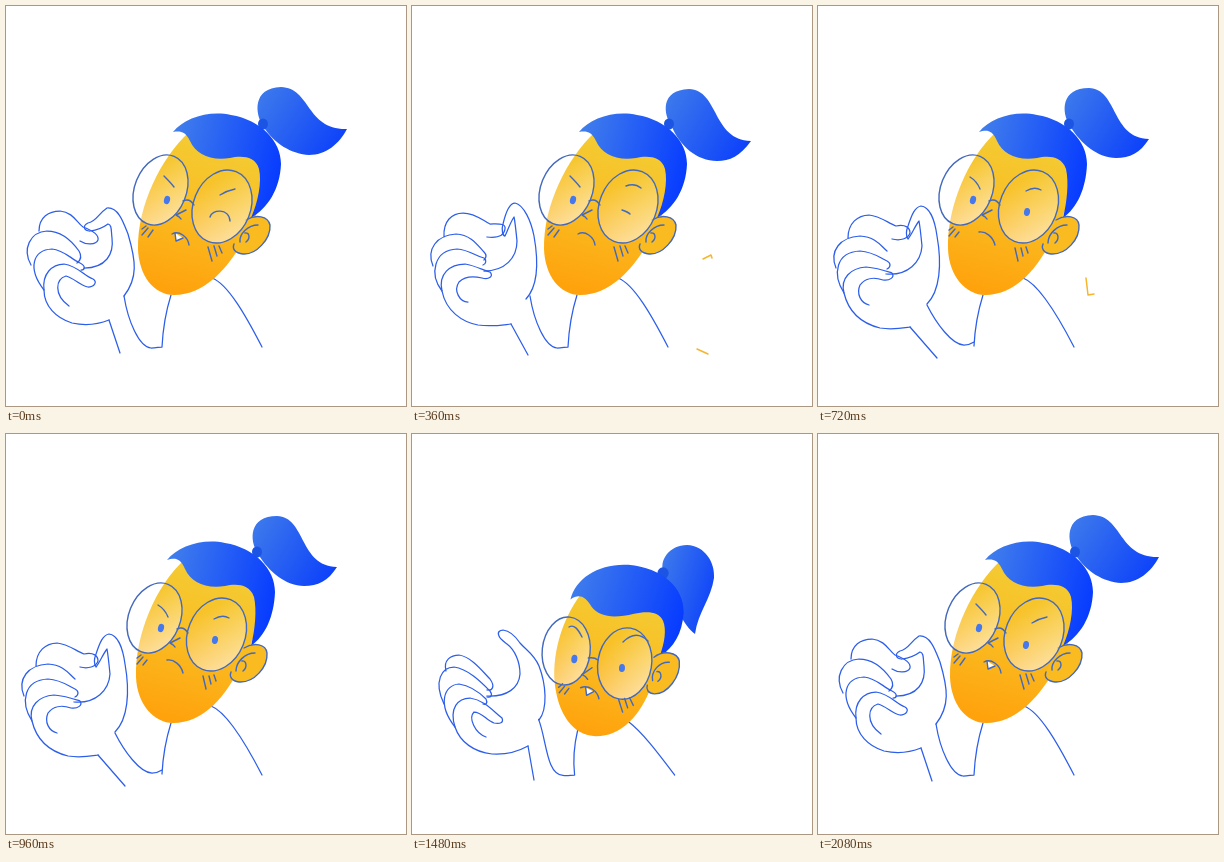
An HTML page that plays this animation: 400x400 px, repeating every 2.12 s.

```html
<!DOCTYPE html>
<html lang="en">
<head>
<meta charset="utf-8">
<title>Finger flick</title>
<style>
html, body { margin: 0; width: 100%; height: 100%; overflow: hidden; background: #fff; }
svg { display: block; width: 100vw; height: 100vh; }
path, ellipse, circle { fill: none; stroke-linecap: round; stroke-linejoin: round; vector-effect: non-scaling-stroke; }
.line { stroke: #2c5eea; stroke-width: 1.25; }
.ink { stroke: #4269bd; stroke-width: 1.4; }
.eye { fill: #4478ec; }
</style>
</head>
<body>
<svg id="stage" viewBox="0 0 400 400">
  <defs>
    <linearGradient id="skin" x1=".6" y1="0" x2=".4" y2="1">
      <stop offset="0" stop-color="#f3cc35"/><stop offset=".45" stop-color="#f9bf24"/><stop offset="1" stop-color="#ffa20c"/>
    </linearGradient>
    <linearGradient id="hair" x1="0" y1=".35" x2="1" y2=".6">
      <stop offset="0" stop-color="#3f7cec"/><stop offset="1" stop-color="#063bff"/>
    </linearGradient>
    <linearGradient id="tail" x1="0" y1=".2" x2="1" y2=".7">
      <stop offset="0" stop-color="#3c78ec"/><stop offset="1" stop-color="#0d42fa"/>
    </linearGradient>
    <linearGradient id="lens" x1=".1" y1=".1" x2=".8" y2=".9">
      <stop offset=".15" stop-color="#fff" stop-opacity="0"/><stop offset="1" stop-color="#fff" stop-opacity=".55"/>
    </linearGradient>
  </defs>
</svg>
<script>
const LOOP = 2120, STEP = 40;
const stage = document.getElementById('stage');

// Keys are [time, pose]; a fractional pose blends two neighbours.
const bodyKeys = [[0, 0], [400, 0], [720, 1], [1000, 1], [1120, 1.6], [1200, 2], [1480, 2.34], [1760, 2.73], [2080, 3]];
const limbKeys = [[0, 0], [360, 1], [720, 2], [1000, 2], [1120, 2.6], [1200, 3], [1480, 4], [1760, 5], [2080, 6]];

function poseAt(keys, t) {
  for (let i = 1; i < keys.length; i++) {
    const [t0, p0] = keys[i - 1], [t1, p1] = keys[i];
    if (t <= t1) return p0 + (p1 - p0) * (t - t0) / (t1 - t0);
  }
  return keys[keys.length - 1][1];
}

function blend(a, b, k) {
  const to = b.match(/-?[\d.]+/g);
  let i = 0;
  return a.replace(/-?[\d.]+/g, n => (+n + (to[i++] - n) * k).toFixed(2));
}

const parts = [];
function add(tag, attrs, keys, name, poses, shown) {
  const el = document.createElementNS('http://www.w3.org/2000/svg', tag);
  for (const key in attrs) {
    if (key === 'fill') el.style.fill = attrs.fill;
    else el.setAttribute(key, attrs[key]);
  }
  stage.append(el);
  parts.push({ el, keys, name, poses, shown });
}
const path = (attrs, keys, poses, shown) => add('path', attrs, keys, 'd', poses, shown);
const oval = (attrs, poses, shown) =>
  add('ellipse', { rx: 1, ry: 1, ...attrs }, bodyKeys, 'transform',
    poses.map(([x, y, rx, ry, turn]) => `translate(${x} ${y}) rotate(${turn}) scale(${rx} ${ry})`), shown);

const line = { class: 'line' }, ink = { class: 'ink' };

// Neck, shoulder and forearm
path(line, bodyKeys, [
  'M165 289C160 305 157 320 156 341M118 290C122 315 133 341 145 342C150 342 153 341 156 341M206 272C222 278 240 310 256 341',
  'M165 289C160 305 157 320 156 340M109 299C118 317 134 339 146 339C150 339 153 338 156 336M205 272C221 278 240 310 256 341',
  'M166 300C163 315 163 330 166 341M131 283C141 300 135 341 154 341C158 342 162 341 166 341M222 296C235 309 250 325 266 341']);
path(line, limbKeys, ['M103 314L114 347', 'M99 318L116 349', 'M92 321L119 352', 'M122 311L125 345', 'M116 312L122 346', 'M109 314L118 347']);

// Hand: thumb, index and middle, ring, little finger with palm
path(line, limbKeys, [
  'M78 262C100 262 108 248 106 232C105 224 106 219 102 218C98 221 92 224 84 225C78 225 76 220 82 217C90 216 92 208 101 202C112 201 117 215 122 228C130 255 132 272 118 290',
  'M72 265C93 265 105 252 105 235C104 225 103 215 102 211C98 217 96 224 93 230C91 230 89 224 91 218C94 205 98 197 103 197C112 199 119 215 122 230C127 258 126 280 114 293',
  'M68 268C90 270 103 256 104 240C103 230 102 220 101 215C97 220 94 228 90 233C88 230 88 225 90 220C94 208 97 201 103 200C112 201 117 215 119 230C124 258 122 285 109 298',
  'M81 264C95 266 107 260 108 246C109 236 104 225 98 213C95 209 93 206 92 203C91 200 91 198 92 196C93 188 99 187 102 189C108 192 102 203 112 214C134 238 143 260 131 283',
  'M75 262C95 263 107 254 108 240C108 228 103 216 95 210C91 207 88 205 87 202C85 198 88 196 91 196C99 197 104 203 108 209C114 216 122 220 127 232C134 250 136 275 127 286',
  'M76 262C98 262 107 248 106 236C105 227 104 221 99 218C95 217 90 221 84 221C79 221 77 216 83 213C90 210 94 205 101 203C110 204 117 215 123 228C131 255 132 272 123 287']);
path(line, limbKeys, [
  'M33 225C33 211 43 205 54 205C67 206 71 217 77 221C88 225 93 229 92 234C90 239 80 239 74 235M25 259C16 243 24 226 41 225C56 225 66 235 73 245C76 250 75 254 71 257',
  'M32 231C31 215 40 207 51 207C64 207 71 215 78 218C87 218 94 217 93 223C92 231 84 232 75 231M21 260C14 243 25 229 44 228C60 229 66 240 72 246C75 249 74 252 72 254',
  'M30 232C30 217 40 209 51 209C62 210 70 217 78 220C88 218 92 222 92 227C90 233 82 235 74 233M18 262C11 245 22 231 42 230C58 231 63 240 69 245C72 248 71 252 68 254',
  'M38 240C36 228 43 225 50 225C63 227 75 240 85 250C90 256 86 260 80 258M38 264C26 245 37 236 48 237C62 239 74 252 82 259C85 264 82 266 79 265',
  'M34 237C31 226 39 221 47 221C60 223 71 238 78 245C83 252 81 257 75 256M32 270C21 247 30 233 42 233C57 235 71 250 78 257C81 261 79 264 75 263',
  'M31 232C30 217 41 211 51 211C63 212 69 222 73 230C80 233 87 238 84 242C79 246 68 240 60 232M28 262C16 245 25 230 41 230C55 231 64 241 70 248C74 252 72 256 69 257']);
path(line, limbKeys, [
  'M38 284C21 262 27 244 46 243C58 244 65 253 74 257C80 260 79 264 75 264',
  'M30 285C17 268 22 244 45 243C58 244 63 250 72 252C75 254 74 258 71 259',
  'M26 287C14 268 18 246 42 245C56 246 62 252 69 255C73 257 73 261 69 263',
  'M48 290C31 268 40 250 53 251C67 254 74 262 80 268C82 272 80 274 77 273',
  'M43 293C25 270 32 251 47 250C60 252 68 259 74 265C76 269 74 271 71 270',
  'M40 288C22 268 28 248 45 247C58 249 66 258 76 262C81 265 79 269 75 269']);
path(line, limbKeys, [
  'M63 300C47 288 50 273 60 270C68 272 75 280 82 281C88 281 92 276 87 273C78 270 72 260 58 258C46 258 36 268 38 284C38 300 50 312 66 317C80 320 93 318 103 314',
  'M56 296C48 296 41 285 47 276C53 270 62 270 70 272C77 274 82 270 78 266C72 265 65 260 53 258C38 258 26 268 30 285C34 305 50 316 66 319C80 321 90 319 99 318',
  'M51 299C43 297 38 288 42 279C47 272 56 271 65 274C72 275 77 271 74 267C68 265 60 262 48 261C33 262 22 272 26 287C31 308 46 318 62 322C75 324 85 322 92 321',
  'M80 304C66 298 60 282 67 278C73 279 77 289 84 291C90 293 95 292 93 287C84 281 76 268 62 264C52 264 44 275 48 290C52 308 66 318 85 320C100 320 113 316 122 311',
  'M74 303C63 299 56 284 62 278C70 278 74 286 82 289C88 290 92 289 90 284C81 277 72 266 58 264C46 264 37 274 43 293C48 308 62 318 80 320C95 321 107 317 116 312',
  'M68 301C57 296 52 280 60 275C67 274 73 281 80 284C87 286 91 283 88 278C80 274 70 265 58 263C47 263 35 270 40 288C44 304 56 315 72 319C86 321 98 318 109 314']);

// Ponytail
path({ fill: 'url(#tail)' }, limbKeys, [
  'M257 120C249 108 246 82 275 81C305 82 300 124 341 123C333 138 320 149 303 149C286 148 268 138 257 120Z',
  'M260 121C251 108 248 84 277 83C307 84 300 134 339 135C328 150 318 155 305 155C285 155 268 140 260 121Z',
  'M252 120C243 106 243 82 271 82C300 83 293 132 331 133C322 147 312 152 298 152C280 152 263 138 252 120Z',
  'M250 152C243 138 252 123 271 123C289 123 300 140 299 157C296 178 282 190 278 212C268 205 258 185 250 152Z',
  'M252 140C246 126 258 111 275 111C293 112 303 128 302 144C299 165 286 178 283 200C272 192 260 168 252 140Z',
  'M255 127C249 112 262 100 279 100C296 100 307 120 306 145C303 165 296 178 289 188C286 172 266 160 255 127Z']);
oval({ fill: '#1c55e4' }, [[257, 118, 5, 5.5, 0], [251, 118, 5, 5.5, 0], [248, 150, 6, 6, 0]]);

// Face (its top is tucked under the hair), hair and ear
path({ fill: 'url(#skin)' }, bodyKeys, [
  'M183 126C155 152 131 200 132 243C133 270 148 289 168 289C198 289 222 264 243 225C258 195 266 165 252 146C225 130 195 125 183 126Z',
  'M178 126C150 152 129 200 130 243C131 270 148 289 167 289C197 289 220 264 238 225C253 195 261 165 247 146C220 130 190 125 178 126Z',
  'M167 171C150 195 145 225 148 250C152 285 168 309 192 309C216 309 232 290 238 265C256 235 264 205 252 187C220 170 190 165 167 171Z']);
path({ fill: 'url(#hair)' }, bodyKeys, [
  'M167 126C178 112 203 104 225 109C255 114 275 135 275 158C274 183 262 202 245 212C252 196 256 176 253 163C249 149 234 150 224 152C204 155 190 148 184 135C179 125 174 125 167 126Z',
  'M161 126C172 112 197 104 219 109C249 114 269 135 269 158C268 183 259 202 245 212C249 196 251 176 248 163C243 149 229 150 219 152C199 155 185 148 179 135C174 123 168 124 161 126Z',
  'M154 186C156 160 180 142 212 142C248 144 271 163 270 190C268 208 262 220 249 228C253 215 254 206 250 199C245 190 232 192 221 194C204 199 187 203 177 192C170 180 162 178 154 186Z']);
path({ ...ink, fill: '#fabb20' }, bodyKeys, [
  'M240 214C250 208 262 210 264 219C265 233 250 249 237 248C229 247 226 243 228 238',
  'M238 214C248 208 260 210 261 219C262 233 248 249 233 248C226 247 223 243 225 238',
  'M243 228C252 220 267 222 269 231C271 248 258 266 245 266C240 266 238 262 239 258']);
path(ink, bodyKeys, [
  'M234 236C233 228 242 219 252 219M239 227C243 226 245 232 240 236',
  'M230 237C230 228 239 219 249 219M236 227C240 226 242 233 237 237',
  'M244 252C242 242 250 232 260 233M248 243C252 242 254 249 249 253']);

// Glasses
const lens = { ...ink, fill: 'url(#lens)' };
oval(lens, [[154.5, 184, 25.8, 36.3, 22], [148.5, 184, 25.8, 36.3, 22], [154, 234, 23, 33, -2]]);
oval(lens, [[216, 200.5, 28.6, 37.6, 22], [210.5, 200.5, 28.6, 37.6, 22], [211, 244.5, 26, 35, 3]]);

// Bridge, nose, mouth and cheek marks
path(ink, bodyKeys, [
  'M177 195C181 193 185 194 188 199M180 204L170 209C172 210 174 211 175 213',
  'M171 195C175 193 179 194 182 199M174 204L164 209C166 210 168 211 169 213',
  'M176 239C179 239 182 239 185 240M180 249L170 257C173 258 175 260 176 262']);
path({ ...ink, fill: '#fff' }, bodyKeys, ['M169 227L170 235L177 232', 'M164 226L165 234L172 231', 'M176 267L177 275L184 271'],
  t => t < 200 || t > 1040);
path(ink, bodyKeys, [
  'M166 228C173 224 182 231 183 239',
  'M161 226C168 225 175 231 177 239',
  'M170 267C178 264 187 270 189 278']);
path(ink, bodyKeys, [
  'M136 223L140 220M136 229L142 222M142 231L147 224M202 241L206 255M208 240L211 250M213 240L216 247',
  'M131 224L135 221M131 230L137 223M137 231L141 226M197 242L200 255M203 242L205 250M208 241L210 247',
  'M152 269L156 265M153 274L158 268M158 275L162 270M209 278L213 290M215 277L218 286M220 276L224 284']);

// Brows and eyes
path(ink, limbKeys, [
  'M158 170C161 173 165 177 168 181M214 189C219 186 224 184 229 183',
  'M158 170C161 173 165 177 168 181M214 180C219 178 224 178 229 182',
  'M152 171C157 174 160 178 162 183M208 185C213 182 218 181 223 184',
  'M154 206C160 196 168 203 174 213M208 218C216 207 228 207 235 217',
  'M157 193C162 190 166 195 170 203M211 208C218 201 227 198 236 207',
  'M157 181C163 178 166 184 170 191M212 196C219 191 225 189 230 192']);
const winking = t => t < 440;
const eye = { class: 'eye' };
oval(eye, [[161, 194, 3, 4.2, 15], [155, 194, 3, 4.2, 15], [163, 241, 3, 4.2, 5]]);
oval(eye, [[208, 211, 3, 4, 10], [209, 206, 3, 4, 10], [211, 246, 3, 4, 0]], t => !winking(t));
path({ ...ink, 'stroke-width': 1.8 }, [[0, 0], [360, 1]], [
  'M204 211C206 203 223 202 224 215', 'M210 204C213 205 216 206 218 208'], winking);

// Brief flecks
function fleck(from, to, stroke, d, fill = 'none') {
  path({ stroke, 'stroke-width': 1.5, fill }, bodyKeys, [d], t => t >= from && t < to);
}
fleck(320, 400, '#f6b52c', 'M291 253L299 249L300 252M285 343L296 348');
fleck(680, 760, '#f6b52c', 'M268 272L270 289L276 288');
fleck(1180, 1240, '#3968dc', 'M115 130L122 136L128 144');
fleck(1180, 1240, '#66603f', 'M46 206L48 203L49 205L47 208Z', '#f0b52c');

function draw() {
  const t = Math.floor(performance.now() % LOOP / STEP) * STEP;
  for (const { el, keys, name, poses, shown } of parts) {
    const p = poseAt(keys, t), i = Math.floor(p), n = poses.length;
    el.setAttribute(name, blend(poses[i % n], poses[(i + 1) % n], p - i));
    el.style.display = !shown || shown(t) ? '' : 'none';
  }
  requestAnimationFrame(draw);
}
draw();
</script>
</body>
</html>
```
